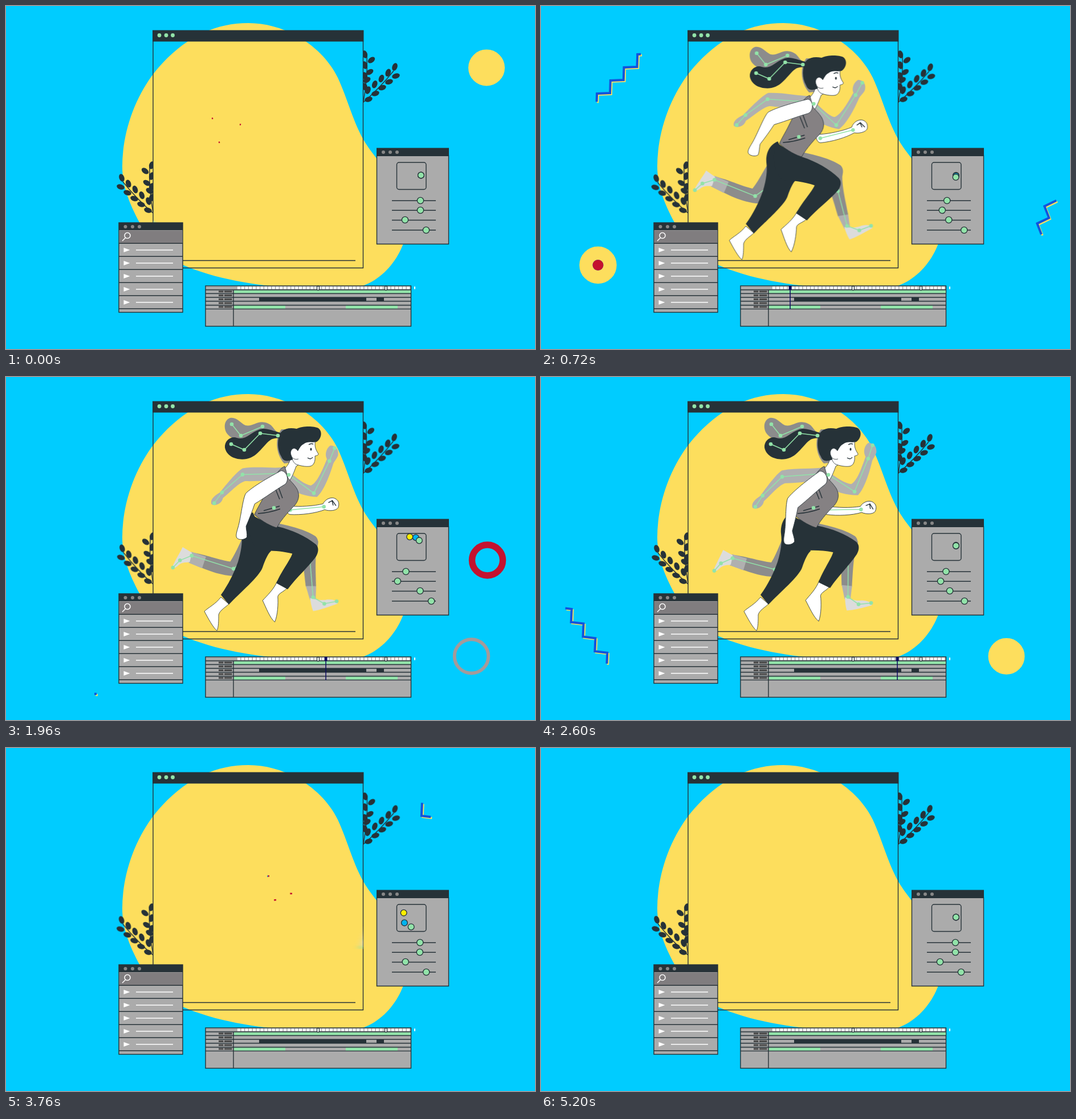
Recreate the animation shown at these times as an HTML page. Size 928x603 px, loop 5240 ms.

```html
<!DOCTYPE html>
<html lang="en">
<head>
<meta charset="utf-8">
<title>Runner</title>
<style>
html, body { margin: 0; width: 100%; height: 100%; overflow: hidden; background: #00ccff; }
svg { display: block; width: 928px; height: 603px; }
.dark { fill: #263238; }
.line { fill: none; stroke: #263238; stroke-width: 1.4; }
.panel { fill: #ababab; stroke: #263238; stroke-width: 1.4; }
.skin { fill: #fff; stroke: #263238; stroke-width: .8; }
.arm { fill: #b0b0b0; }
.leg { fill: #8c8c8c; }
.foot { fill: #dcdcdc; }
.mint { fill: #92e3a9; }
.knob { fill: #92e3a9; stroke: #263238; stroke-width: 1.3; }
.bone { fill: none; stroke: #92e3a9; stroke-width: 1.5; marker: url(#joint); }
.white { fill: none; stroke: #fff; stroke-width: 1.5; }
</style>
</head>
<body>
<svg viewBox="0 0 928 603">
<defs>
  <marker id="joint" markerUnits="userSpaceOnUse" markerWidth="8" markerHeight="8" refX="4" refY="4"><circle class="mint" cx="4" cy="4" r="3.3"/></marker>
  <clipPath id="inside"><rect x="258" y="62" width="369" height="399"/></clipPath>
  <clipPath id="outside"><path d="M0,0H258V603H0ZM627,0H928V603H627Z"/></clipPath>
  <filter id="smear"><feGaussianBlur id="smearAmount" stdDeviation="0 0"/></filter>
</defs>

<path fill="#fdde5d" d="M204,282C204,215 232,145 275,100C320,52 370,30 425,30C490,30 555,70 582,126C600,165 609,205 630,240C655,280 705,325 705,375C705,432 660,494 600,497C500,500 390,490 310,455C270,436 250,410 235,382C215,345 204,315 204,282Z"/>
<g id="plants" clip-path="url(#outside)" style="filter:blur(.5px)"></g>
<g id="pulses"></g>
<g id="zigzags"></g>
<path class="line" d="M258,62V460.5H626.5V62M300,447.5H613"/>

<g clip-path="url(#inside)"><g id="runner" filter="url(#smear)">
  <g id="farArm">
    <path class="arm" d="M490,158C465,160 440,153 411,155C400,160 380,182 368,195C358,200 350,206 352,214C356,219 370,216 373,205C385,197 402,180 414,178C435,180 465,180 488,178Z"/>
    <path class="bone" d="M488,169L410,166L372,195L357,213"/>
  </g>
  <g id="farFist">
    <path class="arm" d="M490,165C505,180 518,192 528,194C540,190 552,165 560,150C556,140 562,130 568,127C578,128 582,135 580,145C577,152 572,155 570,160C562,180 550,205 537,215C520,213 500,205 490,195Z"/>
    <path class="bone" d="M491,172L532,208L564,154L575,132"/>
  </g>
  <g id="farBackLeg">
    <path class="leg" d="M420,265C405,285 398,305 385,322C365,318 350,310 322,303L313,320C335,330 360,345 392,348C405,348 415,330 430,300Z"/>
    <path class="arm" d="M343,311L318,301L312,320L335,331Z"/>
    <path class="foot" d="M319,303L303,292C299,300 290,312 283,326C285,330 290,327 296,322C303,318 310,320 314,319Z"/>
    <path class="bone" d="M284,327L297,315L318,308L390,335L410,320"/>
  </g>
  <path class="leg" d="M440,250C470,258 510,262 538,280C546,288 541,298 540,305L520,312L460,300Z"/>
  <g id="farShin">
    <path class="leg" d="M542,288C538,310 544,340 548,368L530,370C525,350 520,325 512,308Z"/>
    <path class="arm" d="M548,367L550,390L540,392L530,369Z"/>
    <path class="foot" d="M540,389C550,390 560,392 570,388C580,386 588,388 589,393C575,400 560,408 548,411C544,404 542,396 540,389Z"/>
    <path class="bone" d="M532,325L545,387L566,396L587,389"/>
  </g>
  <path class="leg" d="M478,92C467,105 467,135 483,152L500,150V92Z"/>
  <path class="leg" d="M475,100C462,92 465,84 450,80C435,76 428,88 415,85C405,80 400,70 388,72C376,76 376,95 386,103C396,113 415,112 425,105C440,95 455,98 475,108Z"/>
  <path class="bone" d="M391,83L407,103L445,87"/>
  <path class="dark" d="M476,98C460,94 450,88 438,93C425,97 415,112 400,107C390,103 378,112 379,124C382,140 400,147 417,144C438,140 447,118 460,110C466,107 470,108 476,107Z"/>
  <path class="skin" d="M372,387L386,399C380,405 370,410 368,418C368,428 368,440 365,446C358,440 350,425 343,412C350,405 362,400 372,387Z"/>
  <path class="dark" d="M428,238C412,245 407,260 408,275C410,290 408,305 402,325C395,345 385,365 372,383L386,400C405,380 440,350 445,335C450,320 455,310 460,306Z"/>
  <g id="frontLeg">
    <path class="skin" d="M465,360L481,374C475,380 465,382 464,388C464,400 462,420 456,432C448,425 442,405 437,393C445,385 458,375 465,360Z"/>
    <path class="dark" d="M425,240C440,250 460,262 472,265C495,272 520,285 536,300C542,306 540,315 535,322C520,340 500,355 482,376L463,364C472,345 490,325 494,314C475,308 455,306 440,306C425,300 415,270 425,240Z"/>
  </g>
  <g id="fist">
    <path class="skin" d="M492,222C492,232 494,240 500,241C520,240 545,234 560,226C568,228 580,226 583,220C585,212 582,206 574,204C565,203 558,210 556,216C540,222 515,226 500,226Z"/>
    <path class="line" d="M565,213L571,209L574,217M571,208L579,217"/>
    <path class="bone" d="M500,233L558,221"/>
  </g>
  <path class="skin" d="M494,140C494,150 488,157 482,163C481,172 486,180 491,184C496,178 500,168 504,157L515,150Z"/>
  <path fill="#858183" stroke="#263238" stroke-width=".8" d="M484,157C470,162 455,195 445,215C438,228 432,238 431,242C445,255 462,263 470,265C478,250 495,232 502,225C510,215 510,205 505,196C500,188 494,183 490,178Z"/>
  <path class="line" d="M467,195L475,215M472,191L480,213M437,240Q456,239 476,232M447,235L475,227"/>
  <path class="skin" d="M517,112L538,110C536,120 537,126 543,135C543,138 540,138 537,139C538,148 535,156 528,157C520,158 510,156 503,153C495,147 493,130 500,122Z"/>
  <path class="dark" d="M473,108C474,94 487,87 505,91C515,86 535,86 543,90C551,96 548,109 540,114C530,116 524,112 517,118C511,121 509,128 507,130C500,120 492,129 495,137C496,142 499,143 498,145C490,148 482,150 478,140C472,130 471,118 473,108Z"/>
  <path class="skin" stroke="none" d="M507,130C500,120 492,129 495,137C497,144 503,146 508,144"/>
  <ellipse class="dark" cx="530" cy="127" rx="1.5" ry="2.6"/>
  <path class="line" d="M526,119Q530,116 534,118M524,142Q530,146 533,141"/>
  <g id="nearArm">
    <path class="skin" d="M480,164C455,172 425,183 412,192C405,200 396,232 388,248C384,256 380,263 383,267C386,271 396,272 400,268C402,262 401,255 402,249C410,237 418,224 424,213C445,205 465,195 482,189C492,184 490,166 480,164Z"/>
  </g>
  <path class="bone" d="M390,118L413,128L441,99L472,103"/>
  <circle class="mint" cx="491" cy="172" r="3.3"/><circle class="mint" cx="465" cy="230" r="3.3"/>
</g></g>
<g id="streaks"></g>

<rect class="dark" x="257" y="42.5" width="370.5" height="20"/>
<g class="mint"><circle cx="269" cy="51.5" r="3.4"/><circle cx="281" cy="51.5" r="3.4"/><circle cx="292.500" cy="51.5" r="3.4"/></g>

<rect class="panel" x="198" y="381" width="112" height="157.500"/>
<path class="dark" d="M198,381H310V394H198ZM650,250H777V264H650Z"/>
<rect x="198.700" y="394.500" width="110.600" height="22.500" fill="#807d7f"/>
<g id="list"></g>
<g class="white"><circle cx="213" cy="403.500" r="5"/><path d="M209.500,407.500L204,413"/></g>

<path class="panel" d="M650.500,263V418.500H776.500V263Z"/>
<rect class="dark" x="650" y="249.500" width="127" height="14.500"/>
<g fill="#878787"><circle cx="209.500" cy="388" r="3"/><circle cx="222" cy="388" r="3"/><circle cx="234" cy="388" r="3"/><circle cx="662" cy="257" r="3"/><circle cx="674" cy="257" r="3"/><circle cx="686" cy="257" r="3"/></g>
<rect class="line" x="685.500" y="275" width="51.500" height="47.500" rx="4"/>
<path class="line" d="M677,342.300H754M677,359.300H754M677,376.500H754M677,394H754"/>
<g id="knobs"></g>

<rect class="panel" x="350" y="492" width="360.500" height="71"/>
<path class="mint" d="M400,499.500H710V505.500H400ZM400,526H490V532H400ZM596,526H687V532H596Z"/>
<path class="dark" d="M444,512H632V519H444ZM650,512H663V519H650Z"/>
<path class="line" d="M399,499V563M350,499H710M350,505.500H710M350,512.300H710M350,519H710M350,526H710M350,532.600H710"/>
<path stroke="#fff" stroke-width="4.500" stroke-dasharray="5 1.750" d="M406,495.500H708M716,495.500H718"/>
<path stroke="#444" stroke-width="3" stroke-dasharray="8.500 1.500 13.500 200" d="M373,502H397M373,508.700H397M373,515.500H397M373,522.300H397M373,529H397"/>
<g fill="#fff" stroke="#263238" stroke-width="1.300"><rect x="545.500" y="492.500" width="4" height="7" rx="1"/><rect x="664.500" y="492.500" width="4" height="7" rx="1"/></g>
<g id="playhead" fill="#0b0b5e"><rect x="-2.500" y="492" width="5" height="7"/><rect x="-.75" y="498" width="1.500" height="35"/></g>
</svg>

<script>
const LOOP = 5240;
const YELLOW = '#fdde5d', RED = '#c4122f', BLUE = '#1253dc', CYAN = '#00ccff';
const $ = id => document.getElementById(id);
const set = (el, attrs) => { for (const k in attrs) el.setAttribute(k, attrs[k]); return el; };
const add = (parent, tag, attrs) =>
  parent.appendChild(set(document.createElementNS('http://www.w3.org/2000/svg', tag), attrs));

const ramp = (t, a, b) => Math.min(1, Math.max(0, (t - a) / (b - a)));
const smooth = (t, a, b) => { const u = ramp(t, a, b); return u * u * (3 - 2 * u); };
const outCubic = u => 1 - (1 - u) ** 3;
const inOutCubic = u => u < .5 ? 4 * u ** 3 : 1 - 4 * (1 - u) ** 3;
const since = (t, start) => (t - start + LOOP) % LOOP;
const trim = (el, from, to) =>
  set(el, { 'stroke-dasharray': `0 ${from} ${Math.max(0, to - from)} 2`, display: to - from > .001 ? 'inline' : 'none' });

// Plants: the left one mirrors the right one
const plants = ['', 'translate(885 195) scale(-1 1)'].map(transform => {
  const g = add(add($('plants'), 'g', { transform }), 'g', {});
  const leaf = (x, y, angle) => add(g, 'ellipse',
    { class: 'dark', rx: 7, ry: 4.5, transform: `translate(${x} ${y}) rotate(${angle})` });
  add(g, 'path', { class: 'line', d: 'M626,170Q655,145 680,114M627,168Q635,125 633,88' });
  for (let i = 0; i < 5; i++) {
    leaf(635 + 11.75 * i, 148 - 10.25 * i, -70);
    leaf(636 + 12 * i, 164 - 10.25 * i, -18);
  }
  for (let i = 0; i < 4; i++) leaf(629.5, 85 + 19 * i, 75);
  leaf(641, 95, -38);
  leaf(638, 116, -32);
  leaf(633, 130, -30);
  return g;
});

for (let y = 417; y < 533; y += 23) {
  add($('list'), 'path', { class: 'line', d: `M198,${y + .3}H310` });
  if (y > 510) continue;
  add($('list'), 'path', { fill: '#fff', d: `M206.500,${y + 8}L217.500,${y + 12}L206.500,${y + 16}Z` });
  add($('list'), 'path', { class: 'white', d: `M228,${y + 12}H293` });
}

// Discs that are eaten from the centre by the next colour, then by a hole
const pulses = [
  [-35, 843, 108.5, YELLOW, RED],
  [531, 100, 455.5, YELLOW, RED],
  [875, 146.5, 255, BLUE, YELLOW],
  [1588, 844.5, 322, RED],
  [1505, 816.5, 491, '#a59a9a'],
  [2565, 816.5, 491, YELLOW, RED],
].map(([start, cx, cy, ...colors]) => ({
  start,
  rings: colors.map(stroke => add($('pulses'), 'circle', { cx, cy, stroke, fill: 'none' })),
}));

// Staircases: start, duration, position, rotation
let stairs = 'M0,0l23,-1';
for (let i = 0; i < 6; i++) stairs += 'l.7,-22l23,-1';
const zigzags = [
  [40, 1140, 27, 223, 0],
  [430, 1140, 904, 342, 157],
  [1900, 1270, 157, 559, -85],
  [2810, 1140, 854, 273, -85],
].map(([start, time, x, y, angle]) => ({
  start, time,
  lines: [[2, YELLOW, 3.5], [0, BLUE, 4]].map(([shift, stroke, width]) => add($('zigzags'), 'path', {
    d: stairs, pathLength: 1, fill: 'none', stroke, 'stroke-width': width,
    transform: `translate(${x + shift} ${y + shift}) rotate(${angle})`,
  })),
}));

const curves = [
  [0, 0, 'C80,-25 110,10 193,2'],
  [49, 10, 'C70,25 110,20 184,23'],
  [12, 42, 'C80,-25 110,10 193,2'],
];
const streakSet = (x, y) => curves.map(([dx, dy, c]) => [RED, CYAN].map(stroke => add($('streaks'), 'path', {
  d: 'M0,0' + c, pathLength: 1, fill: 'none', stroke, 'stroke-width': 2.6,
  transform: `translate(${x + dx} ${y + dy})`,
})));
const early = streakSet(361, 198), late = streakSet(269, 223);

const sliders = [[727, 699, 342], [727, 683, 359], [700, 729, 376], [737, 747, 394]]
  .map(([from, to, cy]) => ({ from, to, el: add($('knobs'), 'circle', { class: 'knob', cy, r: 5.6 }) }));
const orbit = [[300, '#ffee00'], [150, '#00b4f0'], [0, '#92e3a9']]
  .map(([lag, color]) => ({ lag, el: add($('knobs'), 'circle', { class: 'knob', r: 5.4, style: 'fill:' + color }) }));

// Limb swing: degrees per ms around a pivot
const limbs = {
  nearArm: [-.0118, 483, 178],
  farArm: [-.0044, 490, 170],
  fist: [.007, 490, 175],
  farFist: [-.0055, 490, 170],
  frontLeg: [-.004, 440, 260],
  farBackLeg: [-.0036, 430, 262],
  farShin: [.008, 538, 295],
};

const runnerX = t => -345 * (1 - ramp(t, 0, 1080)) ** 3
  + 5 * ramp(t, 1080, 1960) + 7.36e-8 * Math.max(0, t - 2123) ** 3;

function drawRunner(t) {
  const x = runnerX(t), speed = runnerX(t + 1) - x;
  const show = t > 0 && x < 350;
  set($('runner'), { transform: `translate(${x} 0)`, display: show ? 'inline' : 'none' });
  if (!show) return;
  set($('smearAmount'), { stdDeviation: `${speed * (t < 1080 ? 4 : 12)} ${speed > .1 ? .5 : 0}` });
  for (const id in limbs) {
    const [rate, px, py] = limbs[id];
    set($(id), { transform: `rotate(${rate * (t - 1080)} ${px} ${py})` });
  }
}

function drawStreaks(lines, tail, head, cyanShare) {
  lines.forEach(([red, cyan], i) => {
    trim(red, tail, head);
    trim(cyan, tail, tail + (head - tail) * cyanShare(i));
  });
}

function draw(t) {
  drawRunner(t);

  const sway = .8 * Math.sin(t / LOOP * 4 * Math.PI);
  plants.forEach(g => set(g, { transform: `rotate(${sway} 627 168)` }));

  for (const { start, rings } of pulses) {
    const s = since(t, start);
    const grow = delay => 32.7 * outCubic(ramp(s, delay, delay + 600));
    const radii = [32.7 * outCubic(ramp(s, 0, 50)), grow(125), grow(195)];
    if (rings.length < 2) radii.splice(1, 1);
    rings.forEach((ring, i) => set(ring, {
      r: (radii[i] + radii[i + 1]) / 2,
      'stroke-width': Math.max(0, radii[i] - radii[i + 1]),
    }));
  }

  for (const { start, time, lines } of zigzags) {
    const u = since(t, start) / time;
    lines.forEach(line => trim(line, smooth(u, .28, 1), smooth(u, 0, .7)));
  }

  const tail = smooth(t, 20, 480);
  drawStreaks(early, tail, smooth(t, -20, 320), () => tail);
  drawStreaks(late, smooth(t, 3100, 3820), smooth(t, 2960, 3400), i => i ? 0 : .3);

  const slide = smooth(t, 260, 1150) - smooth(t, 1500, 4000);
  sliders.forEach(({ from, to, el }) => set(el, { cx: from + (to - from) * slide }));
  orbit.forEach(({ lag, el }) => {
    const turn = start => inOutCubic(ramp(t - lag, start, start + 2450));
    const a = 2 * Math.PI * (turn(230) - turn(2300));
    set(el, { cx: 712 + 16 * Math.cos(a), cy: 297.5 + 17 * Math.sin(a) });
  });

  set($('playhead'), {
    transform: `translate(${Math.max(412, 365 + .1 * t)} 0)`,
    display: t > 200 && t < 3440 ? 'inline' : 'none',
  });
}

function frame() {
  draw(performance.now() % LOOP);
  requestAnimationFrame(frame);
}
frame();
</script>
</body>
</html>
```
